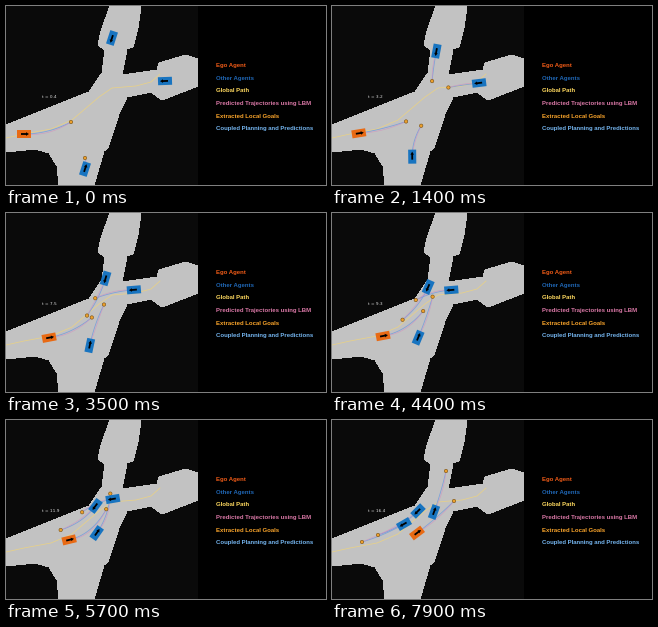
A matplotlib script for the animation above (8000 ms loop, 320 by 179 pixels).

```python
import numpy as np
import matplotlib.pyplot as plt
from matplotlib.animation import FuncAnimation
from matplotlib.patches import Circle, Polygon, Rectangle

W, H, DPI = 320, 179, 100
FRAMES, STEP = 80, 100
PX = 72 / DPI  # points per pixel

ORANGE, BLUE = "#e86a14", "#1874c0"
GOLD, PINK, SKY = "#e6d08a", "#d58bc0", "#6c9ade"

LEGEND = [
    ("Ego Agent", "#ed5a17"),
    ("Other Agents", "#1f66b4"),
    ("Global Path", "#ffd95f"),
    ("Predicted Trajectories using LBM", "#d877a5"),
    ("Extracted Local Goals", "#fba52b"),
    ("Coupled Planning and Predictions", "#74b4ee"),
]

# Outline of the junction, clockwise by arm
ROAD = [
    # top arm, right side
    (135, 0), (132, 22), (127, 41), (121, 43), (116, 69),
    # right arm
    (151, 64), (153, 57), (180, 49), (192, 53),
    (192, 80), (156, 94), (145, 86), (121, 91),
    # bottom arm
    (113, 108), (102, 142), (98, 145), (88, 179),
    (53, 179), (51, 160), (43, 147), (29, 143),
    # left arm, then top arm, left side
    (0, 146), (0, 119), (83, 86), (96, 67), (99, 44), (92, 39), (95, 25),
    (104, 0),
]

PATH = [(0, 132), (18, 128), (45, 123), (66, 114), (93, 91), (106, 82),
        (130, 80), (145, 76), (154, 68)]

# Poses (x, y, heading) and local goals (x, y) at evenly spaced times;
# goals start underneath or ahead of the cars
AGENTS = [
    (ORANGE, [(18, 128, 0), (36, 126, 11), (59, 121, 12), (85, 113, 37)],
     [(65, 116), (81, 110), (97, 92), (122, 81)]),
    (BLUE, [(106, 32, 252), (102, 57, 258), (92, 82, 238), (72, 104, 210)],
     [(106, 34), (90, 95), (60, 109), (30, 122)]),
    (BLUE, [(159, 75, 182), (136, 77, 186), (111, 78, 187), (86, 91, 225)],
     [(157, 75), (97, 84), (79, 90), (46, 115)]),
    (BLUE, [(79, 163, 72), (82, 140, 87), (89, 117, 58), (102, 92, 70)],
     [(79, 152), (95, 101), (103, 77), (114, 51)]),
]

BODY = np.array([(-7, -4), (7, -4), (7, 4), (-7, 4)])
ARROW = np.array([(-3, -0.9), (2, -0.9), (2, -1.8), (5, 0), (2, 1.8),
                  (2, 0.9), (-3, 0.9)])


def smooth(keys):
    """Cubic through four evenly spaced keys, as a function of 0..1."""
    coef = np.polyfit(np.linspace(0, 1, len(keys)), keys, len(keys) - 1)
    return lambda u: u ** np.arange(len(keys) - 1, -1, -1) @ coef


def place(shape, pos, deg):
    a = np.radians(deg)
    c, s = np.cos(a), np.sin(a)
    return shape @ np.array([[c, -s], [s, c]]) + pos


def bezier(p0, p1, p2):
    u = np.linspace(0, 1, 24)[:, None]
    return (1 - u) ** 2 * p0 + 2 * u * (1 - u) * p1 + u ** 2 * p2


fig = plt.figure(figsize=(W / DPI, H / DPI), dpi=DPI, facecolor="black")
ax = fig.add_axes([0, 0, 1, 1])
ax.set_xlim(0, W)
ax.set_ylim(H, 0)
ax.axis("off")

ax.add_patch(Rectangle((0, 0), 192, H, color="#0a0a0a", lw=0))
ax.add_patch(Polygon(ROAD, fc="#c2c2c2", lw=0, antialiased=False))
ax.plot(*np.transpose(PATH), color=GOLD, lw=0.8 * PX)

for i, (label, color) in enumerate(LEGEND):
    ax.text(210, 61.3 + 12.6 * i, label, color=color, family="Liberation Sans",
            weight="bold", size=6 * PX, va="baseline")

clock = ax.text(36, 92, "", color="#dddddd", family="DejaVu Sans",
                size=4.3 * PX, va="baseline")


class Agent:
    def __init__(self, color, poses, goals):
        self.pose_at, self.goal_at = smooth(poses), smooth(goals)
        self.plan, = ax.plot([], [], color=SKY, lw=0.8 * PX, alpha=0.8,
                             zorder=3)
        self.guess, = ax.plot([], [], color=PINK, lw=0.6 * PX, alpha=0.7,
                              zorder=3)
        self.goal = ax.add_patch(Circle((0, 0), 1.7, fc="#eda02c",
                                        ec="#7a5418", lw=0.6 * PX, zorder=4))
        self.body = ax.add_patch(Polygon(BODY, fc=color, lw=0, zorder=5))
        self.arrow = ax.add_patch(Polygon(ARROW, fc="black", lw=0, zorder=6))

    def update(self, u):
        *pos, deg = self.pose_at(u)
        pos, goal = np.array(pos), self.goal_at(u)
        ahead = place(np.array([1, 0]), 0, deg)
        side = place(np.array([0, 1]), 0, deg)
        reach = np.hypot(*(goal - pos))
        bend = pos + 0.5 * reach * ahead
        self.plan.set_data(*bezier(pos, bend, goal).T)
        self.guess.set_data(*bezier(pos, bend + 0.06 * reach * side, goal).T)
        self.body.set_xy(place(BODY, pos, deg))
        self.arrow.set_xy(place(ARROW, pos, deg))
        self.goal.center = goal


agents = [Agent(*spec) for spec in AGENTS]


def draw(i):
    clock.set_text(f"t = {0.4 + 0.202 * i:.1f}")
    for agent in agents:
        agent.update(i / (FRAMES - 1))
    return []


anim = FuncAnimation(fig, draw, frames=FRAMES, interval=STEP, repeat=True,
                     repeat_delay=0, blit=False)
plt.show()
```
